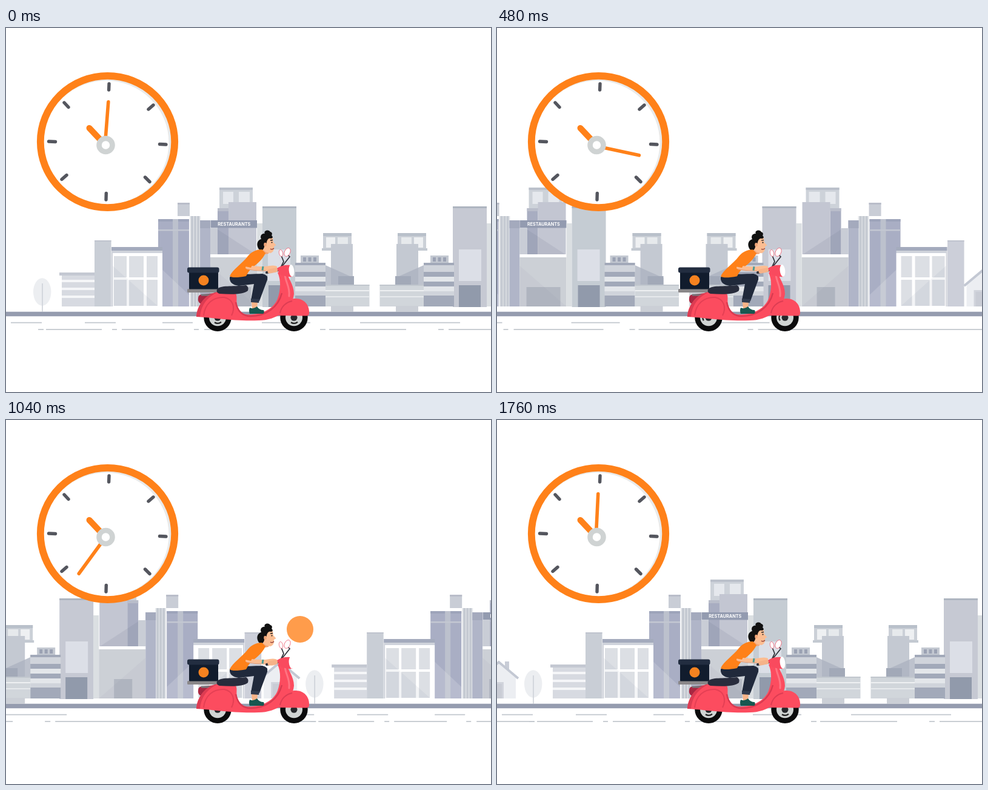
An HTML page that plays this animation: 800 by 600 pixels, repeating every 1.8 s.

```html
<!DOCTYPE html>
<html lang="en">
<head>
<meta charset="utf-8">
<title>Delivery ride</title>
<style>
  html, body { margin: 0; width: 100%; height: 100%; overflow: hidden; background: #fff; }
  svg { display: block; width: 800px; height: 600px; }
  .sign { font: 700 7.25px Inter, "Open Sans", sans-serif; fill: #fff; text-anchor: middle; }
</style>
</head>
<body>
<svg id="stage" viewBox="0 0 800 600">
  <g id="city"></g>

  <g id="clock">
    <ellipse cx="167.5" cy="187.5" rx="111" ry="109" fill="#e9eaea"/>
    <ellipse cx="165" cy="189" rx="103.5" ry="102.3" fill="#fff"/>
    <ellipse cx="167.5" cy="187.5" rx="110.7" ry="108.7" fill="none" stroke="#ff8119" stroke-width="11.8"/>
    <path d="M170 92L169.600 102M243 127L235 134M253.500 191.500L264 192M229.500 246L237 253.500M165.300 272.500L165 283M100 242.500L92 249.500M70.500 187L81.500 187.500M96 123L103 130.500"
      stroke="#54565e" stroke-width="5.400" stroke-linecap="round"/>
    <path d="M137.500 165L163 192" stroke="#ff8119" stroke-width="10" stroke-linecap="round"/>
    <path id="minute" d="M163.200 194.500V121.700" stroke="#ff8119" stroke-width="5.600" stroke-linecap="round"/>
    <circle cx="164.500" cy="193" r="11" fill="#fff" stroke="#cfd3d3" stroke-width="8.600"/>
  </g>

  <circle id="spot" fill="#ff8119"/>

  <g id="wheels"></g>

  <g id="tail">
    <path d="M317 445Q317 439 325 439L343 437L336 455L320 454Q316 451 317 445Z" fill="#a92742"/>
    <path d="M322 440H352" stroke="#77777c" stroke-width="3"/>
    <rect x="299" y="430" width="52" height="6" rx="1.500" fill="#8a8789"/>
    <rect x="302" y="400" width="48" height="30.500" rx="1" fill="#111c2d"/>
    <rect x="299" y="394.500" width="52.500" height="9" rx="3" fill="#222d40"/>
    <circle cx="326" cy="416" r="8.500" fill="#f58220"/>
  </g>

  <g id="scooter">
    <path d="M450 474C450 456 463 446 478 446C492 446 501 457 500 470Q500 474 496 474.500Z" fill="#fc4c5f"/>
    <path d="M314 476C315 457 329 438 350 435L377 436C383 440 379 449 381 456C384 467 391 473 401 472.500C424 472 442 462 448 446C453 432 454 416 448 403L462 398C464 412 475 422 475 438C473 463 446 482 417 482C380 484 338 477 314 476Z" fill="#fc4c5f"/>
    <path d="M314 476C315 457 329 438 350 435C331 444 322 457 320 476Z" fill="#dd3c52"/>
    <path d="M379 452C382 468 391 475 404 475C428 475 449 461 455 437" fill="none" stroke="#d93a50" stroke-width="2.500"/>
    <path d="M326 474C328 455 341 443 360 444C374 447 379 460 372 474" fill="none" stroke="#e43f54" stroke-width="2"/>
    <path d="M460 405C460 418 469 426 467 442" fill="none" stroke="#ff7381" stroke-width="3" stroke-linecap="round"/>
    <path d="M452 470C454 459 462 452 472 450" fill="none" stroke="#dc3d53" stroke-width="2"/>
    <path d="M348 431C354 423 372 427 396 424Q401 427 399 433C391 440 370 439 352 438Q346 436 348 431Z" fill="#282c3c"/>
  </g>

  <g id="legs">
    <path d="M405 452H415L414 463H406Z" fill="#f8b488"/>
    <path d="M402 461Q408 464 414 459Q418 465 425 465Q427 470 424 471H402Q400 466 402 461Z" fill="#175750"/>
    <path d="M369 411C374 406 394 406 423 405Q433 407 431 415L418 450L404 449L409 422L384 425Q368 423 369 411Z" fill="#20293b"/>
    <path d="M404 446L418 447L417 453L404 452Z" fill="#303a4d"/>
  </g>

  <g id="rider">
    <path d="M424 362H435L433 372L422 374Z" fill="#f1a578"/>
    <path d="M421 348Q432 340 440 346L441 353L445.500 358L442 360Q443 368 437 371Q427 371 421 362Z" fill="#fbbd92"/>
    <path d="M416 363C412 355 416 349 421 348C418 342 423 338 427 339C424 334 433 331 436 336C440 337 439 341 438 342C441 344 440 347 437 347C433 346 431 349 430 353C429 358 426 358 426 361C424 368 419 368 416 363Z" fill="#111"/>
    <ellipse cx="427.500" cy="357" rx="2.300" ry="3.200" fill="#f1a578"/>
    <path d="M436 350L440 349.500" stroke="#222" stroke-width="1.300"/>
    <circle cx="438.500" cy="353.500" r="1.100" fill="#222"/>
    <path d="M436 364Q439 366 442 363" fill="none" stroke="#8d3a35" stroke-width="1.200"/>
    <path d="M422 365C412 365 405 369 399 376C390 388 373 399 369 409Q374 413 396 409Q399 402 405 396C414 389 423 382 428 371Z" fill="#ff8119"/>
    <path d="M396 389C405 393 415 393 428 393Q443 390 447 393L447 400Q440 405 431 401L423 399C411 399 400 399 395 396Z" fill="#fbbd92"/>
    <path d="M397 397.500Q412 400.500 429 400" fill="none" stroke="#e99d72" stroke-width="1.200"/>
    <path d="M404 374Q412 381 404 395L394 393Q396 382 404 374Z" fill="#ff8119"/>
    <path d="M424 393L423 399.500" stroke="#4a9c96" stroke-width="3"/>
  </g>

  <g id="bars">
    <path d="M430 403L449 399" stroke="#33333b" stroke-width="4" stroke-linecap="round"/>
    <path d="M435 401L445 399" stroke="#f5b288" stroke-width="7" stroke-linecap="round"/>
    <path d="M452 397L458 385L454 375M453 396L468 377L464 373" fill="none" stroke="#30323b" stroke-width="1.700"/>
    <g fill="#fff" stroke="#ef5166" stroke-width=".7">
      <ellipse cx="453.500" cy="371" rx="3" ry="5.600" transform="rotate(-12 453.500 371)"/>
      <ellipse cx="464" cy="369.500" rx="4.600" ry="7.300" transform="rotate(25 464 369.500)"/>
    </g>
    <path d="M447 396Q456 390 469 391L473 410Q460 411 451 405Z" fill="#f94a5e"/>
    <ellipse cx="471" cy="400" rx="4.300" ry="10" transform="rotate(-6 471 400)" fill="#fff"/>
  </g>
</svg>

<script>
const $ = id => document.getElementById(id);
const LOOP = 1800, STEP = 40, TRIP = 1760, BLOCK = 1098, MIRROR = 1216;

const box = (x1, y1, x2, y2, c) =>
  `<rect x="${x1}" y="${y1}" width="${x2 - x1}" height="${y2 - y1}" fill="${c}"/>`;
const poly = (pts, c, o = 1) => `<polygon points="${pts}" fill="${c}" opacity="${o}"/>`;
const each = (list, fn) => list.map(fn).join('');

// One half of the street; the other half is its mirror image.
function half(mirrored) {
  const wall = mirrored ? '#c6c9d3' : '#c5ccd3';
  const slab = mirrored ? '#cccfd9' : '#c9ced6';
  const glass = '#dcdfe4';
  const door = mirrored ? [359, 389] : [348, 404];
  return [
    // twin purple block and pillars
    box(283, 288, 303, 310, '#c9cdd6'), box(283, 288, 303, 291, '#b9bdc9'),
    box(251, 315, 302, 459, '#a9aec4'), box(251, 315, 302, 319, '#9da4ba'),
    box(275, 315, 284, 459, '#bcc1cd'), box(251, 332, 302, 334.5, '#c3c7d2'),
    poly('251,392 302,440 302,459 251,459', '#fff', .16),
    box(303, 310, 321, 459, '#e7e9ec'),
    each([305, 310, 315], x => box(x, 310, x + 4, 459, '#c5cad2')),
    // office with large panes
    box(146, 350, 173.5, 459, slab), box(146, 350, 173.5, 352, '#bfc3ce'),
    box(174, 361, 258, 367, '#a4abbd'), box(174, 367, 258, 371, '#cfd3db'),
    box(174, 371, 258, 459, '#fff'),
    box(174, 371, 176, 459, '#d0d3db'),
    each([[178, 199], [203, 227], [232, 250]], ([a, b]) =>
      box(a, 376, b, 411, glass) + box(a, 415, b, 458, glass)),
    poly('176,392 250,458 176,458', '#7d8598', .09),
    // shop with sign
    box(320, 317, 337, 459, '#b0b5c8'), box(320, 317, 337, 330, '#a4aabd'),
    box(352, 263, 407, 300, '#cdd2d9'), box(352, 263, 407, 267, '#bbc1cb'),
    box(358, 270, 375, 290, '#e5e8ed'), box(384, 270, 402, 290, '#e5e8ed'),
    box(349, 297, 367, 373, '#a8adc1'), box(349, 297, 367, 302, '#b9bdca'),
    box(367, 287, 413, 373, '#c3c6d2'), box(337, 330, 349, 373, '#c9cdd6'),
    poly('349,332 412,373 349,373', '#677087', .13),
    box(337, 373, 414, 378, '#fff'), box(337, 378, 414, 459, '#ccd0d6'),
    box(door[0], 427, door[1], 459, '#b3b8c2'),
    poly('337,392 414,459 337,459', '#7d8598', .07),
    mirrored ? '' : box(337.5, 317, 414, 329.5, '#939bb0') +
      '<text class="sign" x="376.3" y="326">RESTAURANTS</text>',
    box(414, 322, 423, 459, '#dbdfe2'),
    // tower
    box(423, 294, 479, 460, wall), box(423, 294, 479, 297, '#aeb5c0'),
    box(432, 365, 469, 417, '#dcdfe7'), box(433, 424, 469, 460, '#919aab'),
    // banded block
    box(486, 375, 516, 387, '#c3c8d1'),
    each([490, 498.5, 507], x => box(x, 378, x + 5, 385, '#9ba2b3')),
    box(477, 387, 527, 459, '#d0d4db'),
    each([[387, 391], [402, 410], [418, 426], [441, 459]], ([a, b]) => box(477, a, 527, b, '#a2a9b9')),
    each([410, 426], y => box(477, y, 527, y + 8, '#e3e6ea')),
    // stepped block
    box(523, 338, 570, 366, '#cbd0d7'), box(523, 338, 570, 343, '#b9c0ca'),
    box(528, 345, 543, 362, '#eef0f2'), box(547, 345, 564, 362, '#e6e9ec'),
    box(521, 363, 571, 367, '#c3c9d1'),
    box(536, 356, 572, 424, '#c4c9d2'),
    poly('527,391 574,412 574,424 527,424', '#adb3c1', .8),
    box(548, 409, 574, 423, '#a2a9b8'),
    box(527, 423, 599.5, 459, '#d1d6db'), box(527, 423, 599.5, 425, '#c1c7ce'),
    box(527, 432, 599.5, 434, '#eef0f2'), box(527, 442, 599.5, 444, '#e6e9ec'),
    box(536, 458, 573, 468, '#cbcfd6'),
  ].join('');
}

const treeAndKiosk =
  '<ellipse cx="59.7" cy="435" rx="14.7" ry="22.8" fill="#eceef1"/>' +
  '<path d="M60 421V468" stroke="#cdd1d8" stroke-width="1.6"/>' +
  box(92, 408, 146, 459, '#d7dae1') + box(88, 403, 146, 408, '#c4c8d2') +
  each([415, 428, 441], y => box(92, y, 146, y + 4, '#f5f6f8'));

const house =
  box(1111, 398, 1118, 420, '#c9cdd7') +
  poly('1074,421 1100,398 1129,421 1129,459 1074,459', '#eceef2') +
  box(1086, 432, 1109, 459, '#d1d4dc') + box(1089, 435, 1106, 459, '#c9ccd5') +
  '<path d="M1070 425L1101 399L1133 426" fill="none" stroke="#c3c8d3" stroke-width="4"/>';

const upper = [[8, 59], [130, 181], [258, 308], [422, 502], [584, 749]];
const lower = [[53, 62], [66, 158], [175, 183], [191, 278], [310, 318], [327, 475],
  [518, 527], [533, 660], [713, 722], [730, 1160]];
const dashes = each(upper, ([a, b]) => box(a, 484.8, b, 486.6, '#c4c9cf')) +
  each(lower, ([a, b]) => box(a, 496, b, 497.8, '#c4c9cf'));

const block = treeAndKiosk + half(false) +
  `<g transform="translate(${MIRROR}) scale(-1 1)">${half(true)}</g>` + house + dashes;
$('city').innerHTML = box(0, 467.7, 2200, 475.2, '#959caf') + block +
  `<g transform="translate(${BLOCK})">${block}</g>`;

$('wheels').innerHTML = each([349, 475], x =>
  `<g transform="translate(${x} 477.3)"><circle r="22.7" fill="#0b0b0c"/>
   <circle r="14" fill="#d0d4d3"/><circle r="5.500" fill="#26272b"/>
   <path class="mark" d="M-5 8A9.500 9.500 0 0 0 6 7.400" fill="none" stroke="#222" stroke-width="2.200"/></g>`);
const marks = document.querySelectorAll('.mark');

// time, x, y, radius, opacity
const spotKeys = [
  [120, 431, 290, 23, 0], [200, 431, 298, 21, .75], [280, 431, 309, 17.5, .58], [400, 431, 342, 8, 0],
  [880, 497, 338, 24, 0], [960, 492, 341, 23, .8], [1040, 485, 345, 22, .78],
  [1240, 448, 373, 11, .2], [1300, 440, 380, 8, 0]
];

function spotAt(t) {
  const i = spotKeys.findIndex(k => k[0] > t);
  if (i < 1) return spotKeys[0];
  const a = spotKeys[i - 1], b = spotKeys[i], p = (t - a[0]) / (b[0] - a[0]);
  return a.map((v, n) => v + (b[n] - v) * p);
}

function draw(now) {
  const t = Math.floor((now % LOOP) / STEP) * STEP;
  const turn = t / TRIP;
  $('city').setAttribute('transform', `translate(${-BLOCK * turn})`);
  $('minute').setAttribute('transform', `rotate(${4.4 + 358.4 * turn} 163.2 194.5)`);
  marks.forEach(m => m.setAttribute('transform', `rotate(${360 * turn})`));
  const bob = 1.2 * (1 - Math.cos(8 * Math.PI * turn));
  $('rider').setAttribute('transform', `translate(0 ${bob})`);
  const [, x, y, r, o] = spotAt(t), spot = $('spot');
  spot.setAttribute('cx', x);
  spot.setAttribute('cy', y);
  spot.setAttribute('r', r);
  spot.setAttribute('opacity', o);
}

const start = performance.now();
function tick() {
  draw(performance.now() - start);
  requestAnimationFrame(tick);
}
tick();
</script>
</body>
</html>
```
